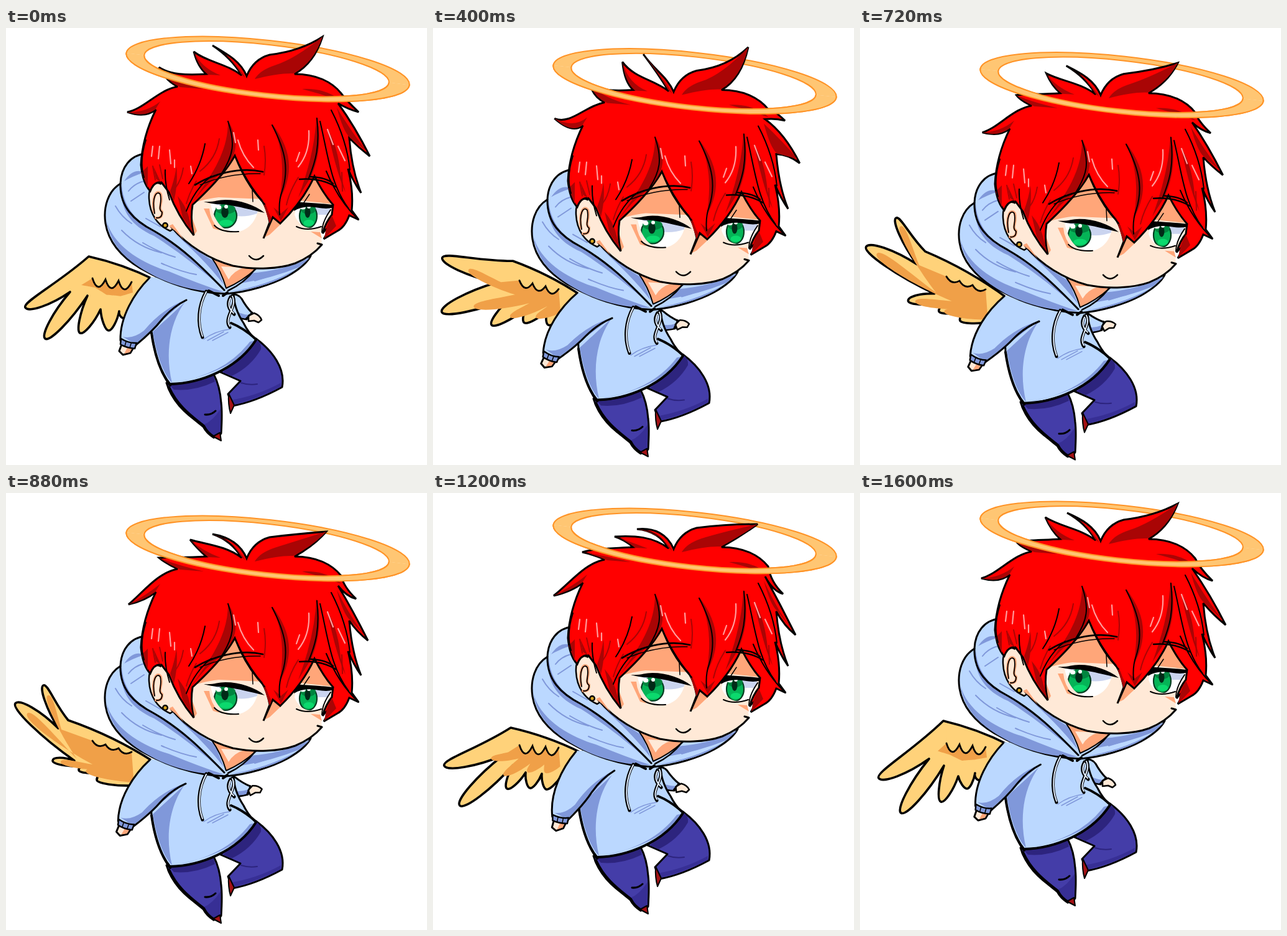
Animation of 677x702 px, one loop 1.68 s. Source, as an HTML page:

```html
<!DOCTYPE html>
<html lang="en">
<head>
<meta charset="utf-8">
<title>Floating angel</title>
<style>
html, body { margin: 0; width: 100%; height: 100%; overflow: hidden; background: #fff; }
svg { display: block; width: 677px; height: 702px; }
</style>
</head>
<body>
<svg id="stage" viewBox="0 0 677 702" xmlns="http://www.w3.org/2000/svg"></svg>
<script>
const INK = '#000', BLUE = '#bbd8ff', SHADE = '#8098da', PANTS = '#443da8', DUSK = '#372f95', NIGHT = '#2d247e';
const RED = '#ff0000', WINE = '#a90505', SKIN = '#ffe9d7', TAN = '#ffa679', GOLD = '#ffd27a', AMBER = '#f0a048';
const STEP = 80, FRAMES = 21, KEYS = [0, 3, 7, 11, 15, 18, 20];

const fill = (c, d) => `<path d="${d}" fill="${c}"/>`;
const line = (d, w = 3, c = INK) =>
  `<path d="${d}" fill="none" stroke="${c}" stroke-width="${w}" stroke-linecap="round" stroke-linejoin="round"/>`;
const shape = (c, d, w = 3) =>
  `<path d="${d}" fill="${c}" stroke="${INK}" stroke-width="${w}" stroke-linejoin="round"/>`;
const oval = (c, x, y, rx, ry, extra = '') =>
  `<ellipse cx="${x}" cy="${y}" rx="${rx}" ry="${ry}" fill="${c}" ${extra}/>`;

// Periodic Hermite curve through one value per key
function track(vals) {
  const n = KEYS.length;
  const k = i => KEYS[(i + n) % n] + FRAMES * Math.floor(i / n);
  const v = i => vals[(i + n) % n];
  const slope = i => (v(i + 1) - v(i - 1)) / (k(i + 1) - k(i - 1));
  return f => {
    let i = n - 1;
    while (KEYS[i] > f) i--;
    const h = k(i + 1) - k(i), u = (f - k(i)) / h, w = 1 - u;
    return v(i) * (1 + 2 * u) * w * w + slope(i) * h * u * w * w
         + v(i + 1) * u * u * (3 - 2 * u) - slope(i + 1) * h * u * u * w;
  };
}
const points = s => s.split(' ').map(p => p.split(',').map(Number));
function pointTrack(s) {
  const ps = points(s), x = track(ps.map(p => p[0])), y = track(ps.map(p => p[1]));
  return f => [x(f), y(f)];
}
// Swings around the wing root instead of moving straight
const ROOT = [235, 405];
function swing(ps) {
  const rel = ps.map(p => [ROOT[0] - p[0], p[1] - ROOT[1]]);
  const r = track(rel.map(p => Math.hypot(...p)));
  const a = track(rel.map(p => Math.atan2(p[1], p[0])));
  return f => [ROOT[0] - r(f) * Math.cos(a(f)), ROOT[1] + r(f) * Math.sin(a(f))];
}

const bodyY = track([0, 18, 30, 28, 13, 2, 0]);
const haloY = track([0, 12, 25, 23, 11, 2, 0]);
const armTurn = track([0, 3, 5.5, 2.5, -5, -3, -1]);
const farTurn = track([0, -14, -25, -23, -6, 0, 0]);
const shadeReach = track([0, .4, .85, .9, .35, 0, 0]);
const covertTop = track([402, 390, 372, 370, 392, 402, 402]);
const covertEnd = track([408, 397, 392, 388, 396, 405, 408]);
const covertDrop = track([26, 24, 15, 11, 26, 28, 26]);

const tips = {
  horn: '195,135 195,122 196,123 197,151 194,152 195,143 195,137',
  low: '246,63 247,52 255,76 246,76 240,82 255,83 253,80',
  left: '302,38 305,24 303,37 296,47 292,57 296,46 298,39',
  mid: '332,28 343,15 332,22 332,38 328,45 331,38 333,32',
  top: '509,14 507,0 508,15 515,34 522,37 513,22 511,17',
  back: '567,135 567,117 565,133 563,142 563,149 565,143 567,141',
  side: '585,206 592,186 586,201 582,209 583,215 586,216 588,212'
};
for (const name in tips) tips[name] = pointTrack(tips[name]);

// wrist, then feather tips and the valleys between them
const poses = [
  '133,367 31,449 103,424 63,499 131,430 119,490 152,452 165,486 182,455 188,466',
  '142,367 8,402 104,406 40,480 122,422 106,474 146,437 150,460 178,434 187,458',
  '115,329 37,296 100,362 3,372 130,397 86,428 155,415 142,438 185,428 180,446',
  '100,337 60,281 84,350 15,310 110,402 75,402 136,411 117,417 158,420 146,433',
  '125,364 18,425 112,409 43,489 129,424 119,462 149,436 156,461 175,438 182,463',
  '135,367 54,482 108,431 91,517 132,443 145,502 164,453 172,483 187,450 193,466',
  '134,366 30,458 111,427 66,514 135,438 130,496 158,455 172,475 185,450 190,461'
].map(points);
const wing = poses[0].map((_, i) => swing(poses.map(p => p[i])));

const mix = (a, b, u) => [a[0] + (b[0] - a[0]) * u, a[1] + (b[1] - a[1]) * u];
const fmt = p => p.map(n => n.toFixed(1)).join();
const near = (p, dx, dy) => fmt([p[0] + dx, p[1] + dy]);
function bow(a, b, k) {
  const m = mix(a, b, .5);
  return `Q${fmt([m[0] + (b[1] - a[1]) * k, m[1] - (b[0] - a[0]) * k])} ${fmt(b)}`;
}
// Rounded feather: both edges swell sideways from its axis
function feather(from, tip, to, slim = 1) {
  const base = mix(from, to, .5), dx = tip[0] - base[0], dy = tip[1] - base[1];
  const len = Math.hypot(dx, dy) || 1, w = (3 + len * .07) / len;
  const side = (p, s) => near(p, -dy * w * s, dx * w * s);
  return `C${side(mix(from, tip, .5), slim)} ${side(tip, 1)} ${fmt(tip)}`
    + `C${side(tip, -1)} ${side(mix(to, tip, .5), -1)} ${fmt(to)}`;
}

const farArm = shape(BLUE, 'M350,428 Q372,424 379,435 Q386,448 396,458 L387,468 Q372,466 352,458Z')
  + fill(SHADE, 'M366,452 Q377,460 390,461 L387,467 Q373,465 365,460Z')
  + shape(SKIN, 'M390,462 L399,458 Q408,461 411,469 L406,473 L399,470 L390,471Z', 2.5)
  + line('M386,467 L396,457', 2.5);

const legs = shape(PANTS, 'M345,553 L402,499 C428,518 450,547 444,577 C420,590 394,602 364,607 L357,588 L377,567Z')
  + fill(NIGHT, 'M349,553 L404,501 Q411,507 410,516 Q394,544 363,559Z')
  + fill(DUSK, 'M360,598 Q404,591 442,570 L442,576 Q404,596 365,605Z')
  + line('M378,570 Q390,574 404,572', 2, NIGHT)
  + shape('#a31114', 'M358,587 L367,606 L361,619 Q357,605 358,587Z', 2)
  + shape(PANTS, 'M258,570 C268,602 290,622 316,637 Q322,652 340,659 L346,651 Q348,618 346,602 Q344,575 334,556Z')
  + fill(DUSK, 'M318,637 Q332,632 345,612 L345,650 L336,655 Q324,650 318,637Z')
  + line('M262,578 C276,609 300,625 318,640 Q323,650 334,657', 5)
  + fill(NIGHT, 'M263,573 L333,557 L336,568 Q303,584 270,581Z')
  + line('M320,621 Q330,622 337,615', 3)
  + shape('#a31114', 'M333,656 L344,650 L346,663Z', 2);

const torso = shape(BLUE, 'M240,402 Q232,450 234,490 C239,525 248,553 264,572 C312,571 372,548 402,501 Q390,490 382,474 Q366,450 366,425 L300,400Z')
  + fill(SHADE, 'M236,488 L288,440 C264,472 255,520 267,570 Q246,548 236,488Z')
  + fill(SHADE, 'M268,570 Q352,557 392,504 L401,502 Q368,552 268,570Z')
  + line('M234,490 C239,525 248,553 264,574', 4)
  + line('M264,572 C312,571 372,548 402,501', 4)
  + line('M362,474 Q382,482 402,500', 4)
  + line('M318,500 Q336,487 359,484 M324,502 L350,488 M332,502 L357,489', 1.5, SHADE);

const arm = shape(SKIN, 'M186,508 L182,519 L188,525 L200,522 L206,512Z')
  + fill(TAN, 'M195,514 L205,511 L199,521 L190,523Z')
  + fill(BLUE, 'M232,400 C206,426 185,464 185,500 L208,510 Q236,484 290,437 L262,402Z')
  + fill(SHADE, 'M188,496 Q204,500 222,486 Q250,452 288,437 Q237,483 208,508Z')
  + line('M231,401 C206,426 183,464 184,502')
  + line('M208,510 Q236,487 251,468 Q268,448 290,437')
  + shape(SHADE, 'M185,499 Q198,507 210,506 L207,515 Q193,514 184,508Z', 2.5)
  + line('M193,504 L191,511 M201,507 L199,514', 1.5);

const hood = shape(BLUE, 'M224,202 C200,204 185,224 184,250 C164,262 156,288 160,314 C165,345 186,368 216,386 C252,407 302,426 354,427 C390,424 428,412 452,399 Q482,382 490,366 L400,300Z')
  + fill(SHADE, 'M161,308 C172,350 218,378 262,391 Q310,411 350,424 C284,424 236,401 203,376 Q168,350 161,308Z')
  + fill(SHADE, 'M392,394 Q446,390 489,369 L472,384 Q428,402 378,410Z M358,424 Q420,414 466,388 Q430,416 358,424Z')
  + fill(SHADE, 'M186,250 C188,290 212,313 247,330 Q298,362 349,419 Q292,368 238,334 C197,316 182,288 186,250Z')
  + fill(SHADE, 'M262,322 Q296,352 336,376 L350,412 Q318,370 262,322Z M190,246 Q205,224 222,232 Q204,238 190,246Z')
  + line('M197,262 Q206,250 222,246 M201,278 L222,264 M176,286 Q186,304 202,314 M186,325 Q212,352 250,361 M220,345 Q245,360 272,368 M250,378 Q282,392 306,396 M400,406 Q432,398 453,382 M225,306 L248,319', 2, SHADE)
  + line('M184,250 C183,287 205,309 238,326 C283,352 313,382 351,421')
  + shape(TAN, 'M330,368 Q346,390 354,418 Q378,408 402,387Z', 2)
  + fill(SKIN, 'M346,383 L383,385 Q366,390 358,404Z')
  + line('M357,422 Q383,410 400,388', 2.5)
  + line('M326,422 L342,430 M349,430 L356,425', 4)
  + line('M322,423 C309,446 307,474 316,497 M364,430 C374,445 348,466 360,481 M361,432 Q352,447 367,460', 5)
  + line('M322,424 C310,446 308,474 316,495 M364,431 C373,446 350,466 360,479 M361,434 Q354,447 366,458', 2, '#e3efff');

function eye(id, white, x, rx, tint) {
  return `<clipPath id="${id}"><path d="${white}"/></clipPath>` + fill('#fff', white)
    + `<g clip-path="url(#${id})">` + fill('#cad4ef', tint)
    + oval('#05b457', x, 302, rx, 19, 'stroke="#013b20" stroke-width="2.2"')
    + oval('#00853f', x, 291, rx - 2, 8) + oval('#0bd96d', x + 1, 313, rx * .6, 5)
    + oval('#012b18', x - 1, 296, rx * .32, 9) + '</g>'
    + oval('#fff', x - rx * .6, 288, 4.2, 3.6) + oval('#fff', x + 1, 287, 3, 3);
}
const face = shape(SKIN, 'M264,326 C245,318 231,300 230,274 C229,254 238,246 248,250 C260,262 270,295 270,322Z', 2.5)
  + line('M238,296 C234,270 243,258 249,267 C253,282 243,289 251,295 Q252,306 241,305', 4, TAN)
  + line('M239,298 C234,272 242,260 248,267 C252,282 243,290 251,296 Q251,306 242,305', 1.8)
  + fill(SKIN, 'M248,252 C262,300 262,318 274,326 C300,355 330,372 365,382 C400,389 440,387 465,378 Q492,367 508,347 L506,328 L526,296 L526,240 L370,198Z')
  + line('M266,320 C292,350 328,372 365,382 C400,389 440,387 465,378 Q492,367 508,348 L501,346')
  + fill(TAN, 'M368,200 L296,284 Q310,276 342,272 L416,275Z M494,234 L462,276 L528,283Z')
  + fill(TAN, 'M296,296 L302,334 L307,326Z M318,290 L333,322 L343,325 Q328,308 327,290Z M412,338 L428,306 L442,315 L424,332Z M490,327 L508,338 L505,328Z M262,318 L272,326 L286,340 L268,315Z')
  + eye('le', 'M329,283 C344,277 378,280 405,293 C402,310 390,324 374,327 C352,330 336,315 329,283Z', 353, 18, 'M330,278 L408,288 L404,298 Q380,306 362,300Z')
  + eye('re', 'M466,288 C482,282 506,284 522,290 Q516,316 502,321 C485,324 470,318 464,300Z', 486, 14, 'M490,280 L524,286 L516,300 L496,300Z')
  + fill(INK, 'M318,279 C335,280 340,276 353,276 C376,276 400,284 416,297 C395,292 375,287 350,283 Q334,284 318,279Z')
  + fill(INK, 'M465,279 C485,281 512,282 533,285 Q523,293 497,288 Q477,285 463,294Z')
  + line('M335,317 Q346,329 374,327 M467,319 Q484,327 507,319', 2)
  + line('M522,292 Q508,312 508,328', 2)
  + line('M396,260 L397,279 M488,267 L478,282', 1.5)
  + line('M391,366 Q402,378 414,366', 2.5)
  + oval('#d9a520', 256, 317, 3.8, 3.8, 'stroke="#000" stroke-width="2.5"');

const strands = fill(WINE, 'M357,148 C377,184 372,205 346,234 Q320,252 298,283 C322,246 358,206 357,148Z M428,154 C459,195 464,232 440,276 C446,236 448,200 428,154Z M411,272 L427,306 L415,336 L424,314Z M276,270 Q288,284 293,300 L301,330 L284,304Z M499,142 C510,182 500,218 490,240 L470,272 Q497,200 499,142Z M524,301 Q514,318 512,338 L531,318Z M218,232 L228,257 L228,222Z M241,242 L237,222 L249,248Z M264,262 Q272,240 274,222 Q277,250 270,278Z M516,160 Q534,190 538,236 L546,264 Q532,236 516,160Z M476,98 Q515,96 540,118 L505,106Z M430,288 L442,310 L454,288 L442,298Z')
  + line('M357,150 C369,185 366,204 346,235 M368,205 Q385,252 416,283 M428,156 C450,198 455,228 444,262 Q438,278 440,300 M500,145 C505,190 498,214 487,241 M505,150 C518,205 522,252 551,290 M523,132 Q548,180 553,228 M515,230 Q535,278 567,308 M330,238 Q304,258 290,294 M320,186 Q314,220 294,250 M225,180 Q214,215 222,240 M256,228 Q255,250 263,276', 2)
  + line('M343,178 Q338,210 312,230 M415,190 Q419,212 415,236 M470,240 Q456,262 451,284 M285,225 Q282,244 273,256 M540,232 L541,262 M306,246 Q296,262 290,282 M236,222 L240,244 M247,220 L252,242', 2, WINE)
  + line('M236,190 L234,206 M247,190 L245,210 M263,196 L265,218 M271,212 L271,224 M373,180 Q380,206 398,224 M366,168 L369,184 M405,180 L406,196 M487,165 Q489,200 470,223 M467,214 L472,200 M517,163 L526,187 M534,190 L545,213 M297,222 L299,234', 2.2, '#ff9d9d')
  + line('M304,252 C330,236 374,222 413,231', 2.8)
  + line('M312,252 C345,238 376,233 409,234', 1.5)
  + line('M472,243 C492,241 514,245 530,255 M490,239 Q515,240 526,250', 2.5);

const arc = (a, b, x, s) => `M${x - a},0 A${a},${b} 0 0 ${s} ${x + a},0`;
function half(s) {
  return fill('#ffc673', arc(230, 46, 0, s) + `L196,0 A198,39 0 0 ${1 - s} -200,0Z`)
    + line(arc(229, 46, 0, s), 2, '#ff9326') + line(arc(198, 39, -2, s), 2, '#ff9326');
}

document.getElementById('stage').innerHTML =
  `<g id="ring">${half(1)}${half(0)}</g><g id="body">
  <path id="wing" fill="${GOLD}" stroke="#000" stroke-width="3.6" stroke-linejoin="round"/>
  <path id="wingShade" fill="${AMBER}"/>
  <path id="coverts" fill="${GOLD}"/>
  <path id="scallops" fill="none" stroke="#000" stroke-width="2.8" stroke-linecap="round"/>
  <g id="farArm">${farArm}</g>${legs}${torso}<g id="arm">${arm}</g>${hood}${face}
  <path id="hair" fill="${RED}" stroke="#000" stroke-width="3" stroke-miterlimit="3"/>
  <path id="hairShade" fill="${WINE}"/>${strands}</g>
  <g id="ringFront">${half(0)}</g>`;

const el = {};
document.querySelectorAll('#stage [id]').forEach(e => el[e.id] = e);
const set = (id, d) => el[id].setAttribute('d', d);
const move = (id, t) => el[id].setAttribute('transform', t);

function drawWing(f) {
  const [wrist, t1, v1, t2, v2, t3, v3, t4, v4, t5] = wing.map(p => p(f));
  const end = [206, 442], top = [238, 404];
  set('wing', `M${fmt(top)}` + bow(top, wrist, -.06) + feather(wrist, t1, v1, -.3)
    + feather(v1, t2, v2) + feather(v2, t3, v3) + feather(v3, t4, v4) + feather(v4, t5, end) + 'Z');

  const a = [139, covertTop(f)], b = [202, covertEnd(f)], drop = covertDrop(f), k = shadeReach(f);
  const valleys = [v1, v2, v3, v4, end];
  let shade = `M${fmt(a)}`;
  [t1, t2, t3, t4].forEach((tip, i) => {
    const inner = j => mix(mix(a, b, j / 4), valleys[j], .5 + .45 * k);
    shade += `L${fmt(inner(i))}` + feather(inner(i), mix(mix(inner(i), inner(i + 1), .5), tip, k * .92), inner(i + 1), .3);
  });
  set('wingShade', shade + `L${fmt(b)}Z`);

  let d = `M${fmt(a)}`;
  for (let i = 0; i < 3; i++) {
    const p = mix(a, b, (i + .4) / 3), q = mix(a, b, (i + 1) / 3);
    d += `Q${near(p, 0, drop)} ${fmt(q)}`;
  }
  set('scallops', d);
  set('coverts', d + `L${fmt(mix(top, wrist, .2))} ${near(wrist, 6, 6)}Z`);
}

function drawHair(f) {
  const p = {};
  for (const name in tips) p[name] = fmt(tips[name](f));
  const { horn, low, left, mid, top, back, side } = p;
  const s = tips.side(f), b = tips.back(f);
  set('hair', `M${horn} C222,130 244,100 276,94 Q258,86 ${low}`
    + `C264,75 290,76 322,74 Q308,62 ${left} C324,55 354,57 379,76 Q362,48 ${mid}`
    + `C356,42 377,53 387,77 Q398,50 424,43 Q474,37 ${top}`
    + `Q496,56 464,74 C500,74 525,87 539,105 Q${near(b, -20, -19)} ${back}`
    + `Q${near(b, -16, -4)} 534,121 Q${near(s, -24, -48)} ${side}`
    + `Q${near(s, -18, -14)} 552,177 Q556,228 571,265 Q559,248 550,226 Q559,262 556,293 L567,308 L552,301`
    + 'Q545,320 533,326 L511,339 Q520,322 526,318 Q518,318 509,330 Q514,312 524,300 L526,284 Q510,266 496,238'
    + 'Q478,278 441,314 L429,304 L414,338 Q421,320 424,312 Q420,290 412,278 Q386,248 368,205'
    + 'Q350,238 300,284 Q296,308 302,333 Q276,302 262,264 L250,248 Q238,246 232,262 Q220,250 217,220'
    + `Q219,176 241,131 Q224,145 ${horn}Z`);
  set('hairShade', `M${top} Q464,50 432,60 Q408,68 400,82 Q440,72 462,73 Q495,56 ${top}Z`
    + `M${horn} Q226,136 248,118 L240,131 Q222,144 ${horn}Z`
    + `M${left} Q314,64 345,76 L325,75 Q309,62 ${left}Z`
    + `M${low} Q272,87 318,98 L280,95 Q260,86 ${low}Z`
    + `M${mid} Q368,52 385,80 L378,74 Q363,48 ${mid}Z`
    + `M${near(s, -4, -7)} Q${near(s, -26, -34)} 532,128 Q542,166 553,176Z`);
}

function draw(f) {
  const h = `translate(421,${(66 + haloY(f)).toFixed(2)}) rotate(6.4)`;
  move('ring', h);
  move('ringFront', h);
  move('body', `translate(0,${bodyY(f).toFixed(2)})`);
  move('arm', `rotate(${armTurn(f).toFixed(2)} 245 415)`);
  move('farArm', `rotate(${farTurn(f).toFixed(2)} 359 457)`);
  drawWing(f);
  drawHair(f);
}

const start = performance.now();
function tick() {
  draw(Math.floor((performance.now() - start) / STEP) % FRAMES);
  requestAnimationFrame(tick);
}
tick();
</script>
</body>
</html>
```
